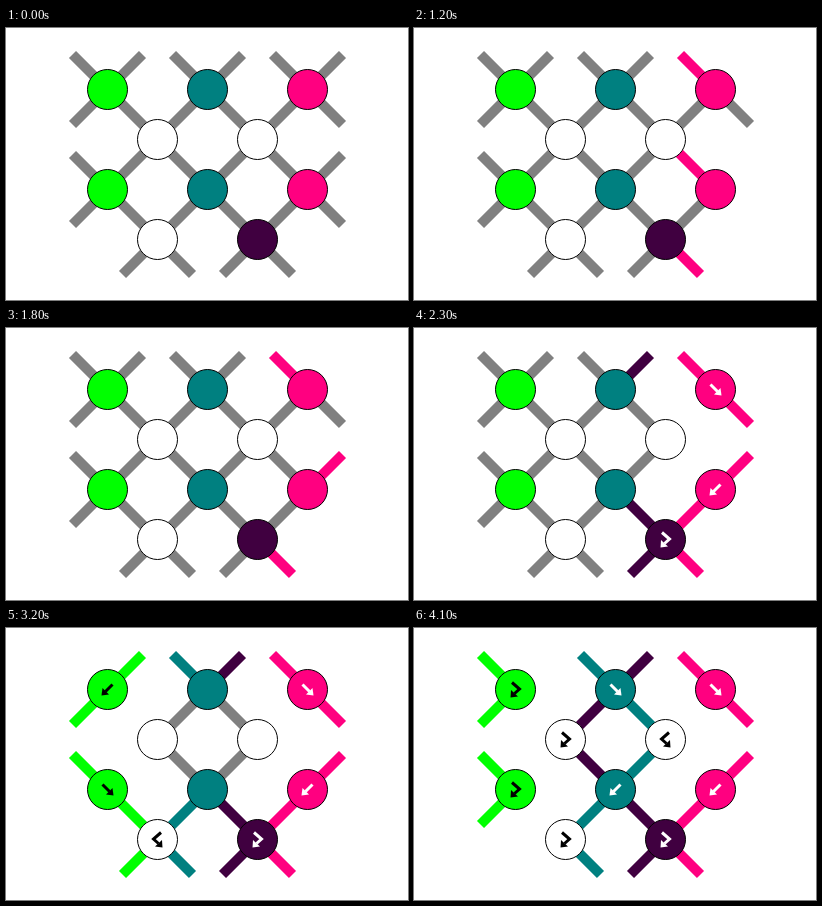
An HTML page with a canvas for the animation above (4200 ms loop, 402 by 272 pixels).

```html
<!DOCTYPE html>
<html lang="en">
<head>
<meta charset="utf-8">
<title>Knot pattern solver</title>
<style>
html, body { margin: 0; width: 100%; height: 100%; overflow: hidden; background: #fff; }
canvas { display: block; }
</style>
</head>
<body>
<canvas id="stage" width="402" height="272"></canvas>
<script>
const ctx = document.getElementById('stage').getContext('2d');
const STEP = 100, LOOP = 4200;
const COLORS = { '': '#808080', g: '#00ff00', t: '#008080', p: '#ff0080', w: '#ffffff', d: '#400040' };

// Knot colours, row by row; B and D sit half a column to the right.
const ROWS = { A: 'gtp', B: 'ww', C: 'gtp', D: 'wd' };
const DIRS = { NW: [-1, -1], NE: [1, -1], SW: [-1, 1], SE: [1, 1] };
const REACH = 35;

const knots = Object.entries(ROWS).flatMap(([row, colors], r) =>
  [...colors].map((color, c) => ({
    id: row + (c + 1), color, x: 101.5 + 100 * c + 50 * (r % 2), y: 61.5 + 50 * r
  })));

const knotAt = (x, y) => knots.find(k => k.x === x && k.y === y);

// Inner strings belong to the upper knot; the others are loose ends.
const strings = [];
for (const k of knots) {
  for (const [dir, [dx, dy]] of Object.entries(DIRS)) {
    const joined = knotAt(k.x + 50 * dx, k.y + 50 * dy);
    if (joined && dy < 0) continue;
    const len = joined ? 50 : REACH;
    strings.push({ id: k.id + dir, x1: k.x, y1: k.y, x2: k.x + len * dx, y2: k.y + len * dy });
  }
}

// Each step sets string colours or knot types (f, b, fb, bf); an empty value clears.
const STEPS = [
  '',
  'A3NE:g', 'C3SE:g', 'A3NE: C3SE:', 'A3NE:t', 'C3SE:t', 'A3NE: C3SE:',
  'A3NE:w', 'C3SE:w', 'A3NW:p', 'D2SE:p', 'B2SE:p', 'C3NE:w',
  'D2SW:d', 'A2NE:d', 'A2NW:w', 'A2NW:t', 'D2SW: A2NE: A2NW: B2SE: C3NE:', 'C3NE:p',
  'A3SE:p A3SW:w A3:f', 'B2SE:w C3SW:p C3:b', 'C2SE:d D2:fb', 'D2SW:d', 'A2NE:d', 'A2NW:t',
  'D1SE:t', 'A1SW:w', 'A1SW:g', 'C1NW:g', 'C1SE:g C1:f', 'C1SW:w B1SW:w',
  'A1NW:w C2SW:t D1SW:g D1:bf', 'A1NE:g A1SE:w A1:b', 'A1NE: A1SE: A1: D1SW: D1:',
  'C1:fb C1SW:g C1SE:w A1NW:', 'A1NW:g D1SW:w', 'A1NE:w',
  'D1:fb', 'A1SE:w A1:fb', 'A2:f A2SW:d A2SE:t', 'B1:fb B1SE:d B2:bf B2SW:t', 'C2:b'
];

function stateAt(step) {
  const state = {};
  for (const line of STEPS.slice(1, step + 1)) {
    for (const change of line.split(' ')) {
      const [id, value] = change.split(':');
      state[id] = value;
    }
  }
  return state;
}

function tracePath(points) {
  ctx.beginPath();
  points.forEach(([x, y]) => ctx.lineTo(x, y));
}

function drawArrow(knot, type) {
  const double = type.length === 2;
  const mirrored = type === 'b' || type === 'bf';
  const shaft = double ? [[-3.5, -7], [4, -0.5], [-1, 4]] : [[-5, -5], [2, 2]];
  const head = double ? [[-5, 8], [-4.5, 0.5], [2.5, 7]] : [[6, 6], [5, -1.5], [-1.5, 5]];
  ctx.save();
  ctx.translate(knot.x, knot.y);
  if (mirrored) ctx.scale(-1, 1);
  ctx.fillStyle = ctx.strokeStyle = 'gw'.includes(knot.color) ? '#000' : '#fff';
  ctx.lineWidth = 3;
  tracePath(shaft);
  ctx.stroke();
  tracePath(head);
  ctx.fill();
  ctx.restore();
}

function draw(step) {
  const state = stateAt(step);
  ctx.fillStyle = '#fff';
  ctx.fillRect(0, 0, 402, 272);
  ctx.lineWidth = 10;
  for (const s of strings) {
    ctx.strokeStyle = COLORS[state[s.id] || ''];
    tracePath([[s.x1, s.y1], [s.x2, s.y2]]);
    ctx.stroke();
  }
  for (const k of knots) {
    ctx.beginPath();
    ctx.arc(k.x, k.y, 20, 0, 2 * Math.PI);
    ctx.fillStyle = COLORS[k.color];
    ctx.fill();
    ctx.strokeStyle = '#000';
    ctx.lineWidth = 1;
    ctx.stroke();
    if (state[k.id]) drawArrow(k, state[k.id]);
  }
}

const start = performance.now();
function tick() {
  const elapsed = Math.max(0, performance.now() - start);
  draw(Math.floor((elapsed % LOOP) / STEP));
  requestAnimationFrame(tick);
}
tick();
</script>
</body>
</html>
```
